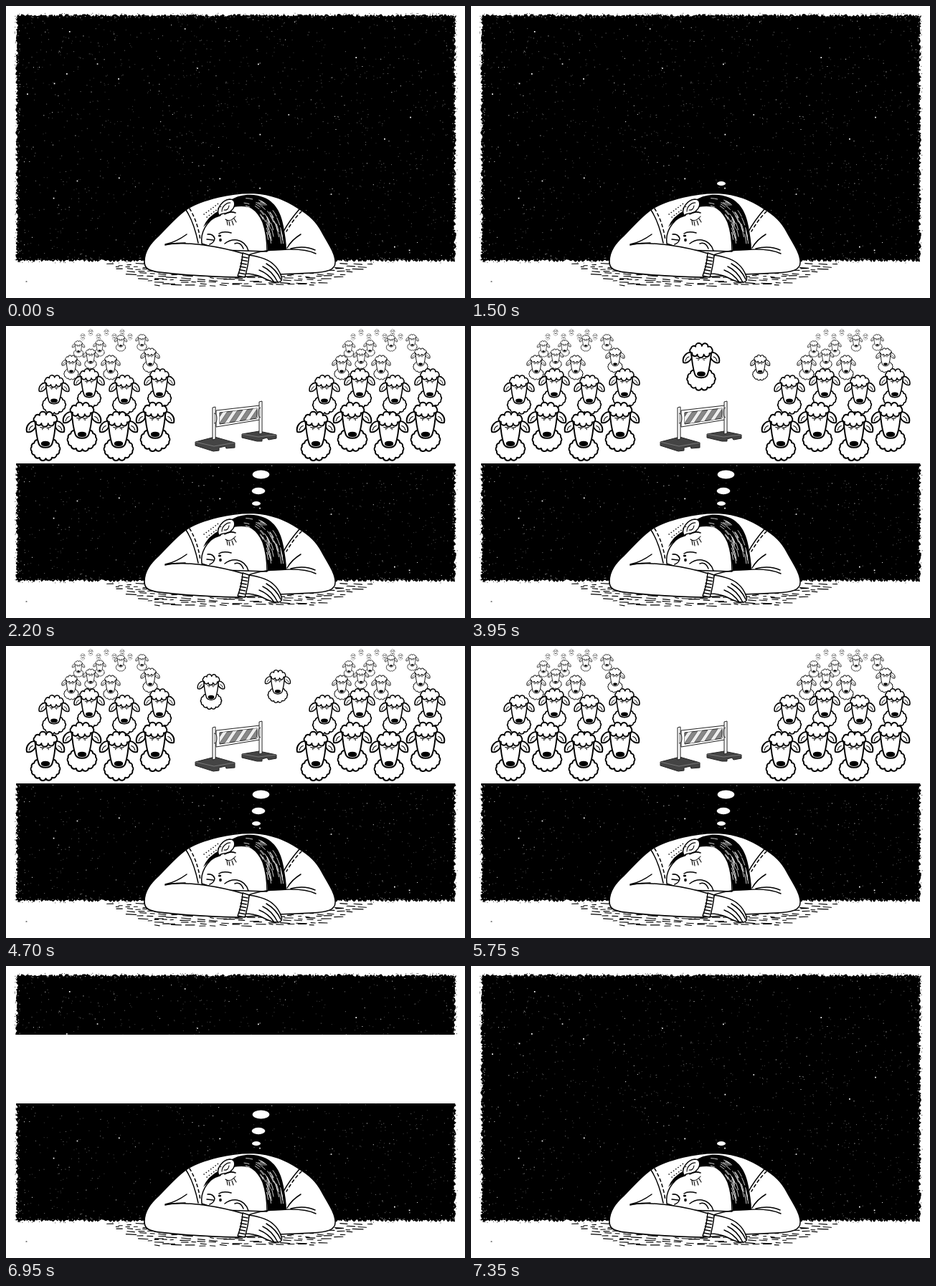
Recreate the animation shown at these times as an HTML page. Size 640 by 408 pixels, loop 7.45 s.

```html
<!DOCTYPE html>
<html lang="en">
<head>
<meta charset="utf-8">
<title>Counting sheep</title>
<style>
html, body { margin: 0; width: 100%; height: 100%; overflow: hidden; background: #fff; }
svg { display: block; width: 100%; height: 100%; }
.ink { fill: none; stroke: #000; stroke-width: 1.5; stroke-linecap: round; stroke-linejoin: round; }
.skin { fill: #fff; }
.wool { stroke-width: 1.9; }
.thin { stroke-width: 1.1; }
</style>
</head>
<body>
<svg id="stage" viewBox="0 0 640 408"></svg>
<script>
const LOOP = 7450;
const stage = document.getElementById('stage');

let seed = 71;
const rnd = () => (seed = (seed * 16807) % 2147483647) / 2147483647;
const span = (a, b) => a + rnd() * (b - a);
const mix = (a, b, u) => a + (b - a) * u;
const f = n => n.toFixed(1);
const times = (n, make) => Array.from({ length: n }, (_, i) => make(i)).join('');

// Closed outline made of round bumps along an ellipse.
function fleece(cx, cy, rx, ry, n) {
  const r = f((rx + ry) * 1.9 / n);
  const d = times(n + 1, i => {
    const a = i / n * Math.PI * 2 + 0.2;
    const p = f(cx + rx * Math.cos(a)) + ' ' + f(cy + ry * Math.sin(a));
    return i ? `A${r} ${r} 0 0 1 ${p}` : 'M' + p;
  });
  return `<path d="${d}Z"/>`;
}

function sheepShape() {
  const ear = s => `<g transform="scale(${s} 1)">
    <path d="M14 -20C20 -21 27 -14 25 -6C21 -4 15 -8 13 -13Z"/>
    <path class="thin" d="M17 -14Q21 -13 22 -8"/></g>`;
  return `<g id="sheep" class="ink skin wool">
    ${fleece(0, 17, 19, 13, 14)}${ear(1)}${ear(-1)}
    <path d="M-14 -21C-13 -8 -11 4 -9 10C-7 17 7 17 9 10C11 4 13 -8 14 -21Z"/>
    ${fleece(0, -23, 16, 6, 11)}
    <path class="thin" d="M-7 -12l5 1M2 -11l5 -1M-4 -10v1M4 -10v1"/>
    <ellipse cy="10" rx="5" ry="2.5" fill="#000"/></g>`;
}

const place = (x, y, w) => `translate(${f(x)} ${f(y)}) scale(${(w / 52).toFixed(3)})`;

// Rows from back to front; every second sheep is shifted by zig.
const rows = [
  { n: 7, x: 107, y: 15, dx: 11, dy: 0, zig: -6, w: 7 },
  { n: 4, x: 101, y: 32, dx: 29.5, dy: -4, zig: 3, w: 18 },
  { n: 1, x: 118, y: 46, dx: 0, dy: 0, zig: 0, w: 22 },
  { n: 3, x: 91, y: 58, dx: 55, dy: -5, zig: 5, w: 27 },
  { n: 4, x: 67, y: 96, dx: 49, dy: 0, zig: -9, w: 43 },
  { n: 4, x: 55, y: 154, dx: 51, dy: 0, zig: -13, w: 54 }
];
const flock = rows.map(r => times(r.n, i =>
  `<use href="#sheep" transform="${place(r.x + i * r.dx, r.y + i * r.dy + i % 2 * r.zig, r.w)}"/>`)).join('');

function night() {
  const L = 15, T = 13, R = 626, B = 356;
  const pts = [], specks = ['', ''];
  const edge = (x0, y0, x1, y1) => {
    const len = Math.hypot(x1 - x0, y1 - y0), nx = (y1 - y0) / len, ny = (x0 - x1) / len;
    for (let s = 0; s < len; s += 1.7) {
      const j = span(-1.9, 1.9), x = mix(x0, x1, s / len), y = mix(y0, y1, s / len);
      pts.push(f(x + nx * j) + ' ' + f(y + ny * j));
      if (rnd() < 0.4) {
        const out = rnd() < 0.4, k = out ? span(1, 3) : -span(1, 4);
        specks[+out] += `M${f(x + nx * k)} ${f(y + ny * k)}h.8`;
      }
    }
  };
  edge(L, T, R, T); edge(R, T, R, B); edge(R, B, L, B); edge(L, B, L, T);

  const stars = (n, size, color) => `<path stroke="${color}" stroke-width="${size}" d="${
    times(n, () => `M${f(span(19, 622))} ${f(span(17, 352))}h${size}`)}"/>`;
  return `<path d="M${pts.join('L')}Z"/>
    <path d="${specks[0]}" stroke="#fff"/><path d="${specks[1]}" stroke="#000"/>
    ${stars(1000, 0.9, '#555')}${stars(420, 0.9, '#999')}${stars(110, 1, '#eee')}${stars(24, 1.7, '#fff')}`;
}

function ground() {
  let d = 'M28 385h1';
  for (let y = 361; y < 392; y += 3.2) {
    const k = (y - 361) / 31, end = mix(506, 425, k);
    for (let x = mix(136, 212, k) + span(0, 10); x < end;) {
      const w = span(4, 15);
      d += `M${f(x)} ${f(y + span(-1.7, 1.7))}l${f(w)} ${f(span(-0.4, 1.2))}`;
      x += w + span(3, 10);
    }
  }
  return `<path class="ink thin" d="${d}"/>`;
}

// A point in the hair: u runs across from the face outwards, v along the strand.
function hairPoint(u, v) {
  const curve = (a, b, c) => mix(mix(a, b, v), mix(b, c, v), v);
  const x = mix(curve(322, 358, 365), curve(322, 386, 391), u);
  const y = mix(curve(279, 277, 340), curve(266, 258, 340), u);
  return f(x) + ' ' + f(y);
}

function sleeper() {
  const line = (d, cls = '') => `<path class="ink ${cls}" d="${d}"/>`;
  const strands = times(48, () => {
    const u = span(0.08, 0.92), v = span(0.1, 0.85);
    return `M${hairPoint(u, v)}L${hairPoint(u, v + 0.05)}L${hairPoint(u, v + 0.1)}`;
  });
  const stubble = times(14, i => {
    const k = i % 7, row = i > 6 ? 4 : 0;
    return `M${f(276 + k * 3.2 + row)} ${f(291 - k * 2.4 + row)}h.3`;
  });
  const ribs = times(6, i => `M${f(329 - i * 0.9)} ${f(350.5 + i * 4.5)}l8 1.5`);

  return line('M193 357C193 342 202 331 213 321C226 308 238 293 252 284C262 277 280 271 296 267' +
      'C312 263 330 261 346 261.500C372 263 392 272 408 283C422 291 433 301 440 315' +
      'C448 330 459 345 459 357C460 369 448 372 425 373L380 375L324 379' +
      'C280 378 240 375 215 372C198 370 193 366 193 357Z', 'skin') +
    // Hair, face and ear
    line('M273 332C271 317 278 303 296 291L318 276C340 275 352 288 358 302C363 316 364 330 364 343L300 341Z', 'skin') +
    `<path d="M315 270C326 263 346 261 361 268C378 276 384 292 387 308C389 320 391 330 391 341L365 342
      C364 322 361 306 354 294C347 281 334 278 317 281Z"/>
    <path d="M297 286Q281 294 275 309Q286 297 300 293Z"/>
    <path d="${strands}" fill="none" stroke="#fff" stroke-width=".8"/>` +
    line('M297 293C292 283 302 271 312 270C321 270 320 280 315 285C309 293 303 287 297 293Z', 'skin') +
    line('M301 287C301 280 308 274 313 275M304 285Q310 286 311 279', 'thin') +
    line(stubble) +
    line('M305 291Q312 286 320 289') +
    line('M306 298Q312 303 320 294M308 300l1 6M311 301l1 6M315 300l2 6M318 297l3 5', 'thin') +
    line('M314 317Q303 314 297 318M281 319Q289 318 291 325Q290 331 284 333M280 326l9 1') +
    `<ellipse cx="298" cy="321" rx="2.200" ry="1.600"/><ellipse cx="299" cy="327" rx="1.800" ry="2.200"/>` +
    line('M305 332Q313 326 322 327Q334 329 338 342M319 332Q327 329 331 339') +
    // Arms
    line('M222 334C237 330 257 332 276 334C297 337 315 341 331 346L324 379C280 378 240 375 215 372' +
      'C198 370 193 366 193 357', 'skin') +
    line('M222 333Q237 330 252 319M224 333Q238 331 250 331') +
    line('M338 348C356 341 380 340 397 340Q420 340 432 346M392 338Q398 327 411 319M397 339Q416 334 431 341') +
    line('M251 285Q262 302 268 331M409 284Q395 300 387 315') +
    `<path class="ink" stroke-dasharray="4 4" d="M256 283Q268 303 271 328M412 287Q400 299 391 315"/>` +
    // Hand and cuff
    line('M339 348C352 350 365 353 373 361Q380 367 384 378Q386 385 380 386C370 387 362 381 355 378Q344 374 334 374Z', 'skin') +
    line('M358 364Q371 370 379 386M363 360Q377 368 383 382M353 369Q366 374 374 386') +
    line('M330 345L339 348Q338 362 333 379L323 377Q329 362 330 345Z', 'skin') +
    line(ribs);
}

function barrier() {
  const board = 'M298 121L350 115V129L298 137Z';
  const stripes = times(5, i => `M${289 + i * 13} 140l20 -30h6l-20 30z`);
  return `<clipPath id="board"><path d="${board}"/></clipPath>
    <g stroke="#222" stroke-linejoin="round">
    <path d="M264 162L291 155L319 163V170L307 171L306 168L297 170V174L289 175L264 167Z" fill="#444"/>
    <path d="M329 151L353 147L377 152V157L366 159L364 156L357 158V161L350 161L329 156Z" fill="#444"/>
    <path d="M264 162L290 168L319 163M329 151L352 155L377 152" fill="none" stroke="#777"/>
    <path d="M293 118L354 111V131L293 141Z" fill="#fff"/>
    <path d="${board}" fill="#888"/>
    <path d="${stripes}" fill="#eee" stroke="#444" stroke-width=".6" clip-path="url(#board)"/>
    <path d="M288 114l4 -1V158l-4 1zM353 106l4 -1V150l-4 1z" fill="#fff"/>
    <path d="M290 122q4 0 4 7t-4 7M355 114q-3 0 -3 7t3 7" fill="#bbb"/></g>`;
}

// A jump rises from a to the top and falls to b, in steps of 150 ms.
// Points are x, y, width; the bend shapes the sideways motion of each half.
const STEP = 150, HALF = 4;
const top1 = [321, 57, 52];
const right = { a: [242, 113, 25], top: top1, b: [404, 104, 25], bend: [u => u, u => 1 - (1 - u) ** 2] };
const left = { a: [422, 70, 20], top: [323, 43, 52], b: [249, 95, 25], bend: [u => u ** 1.2, u => u] };
const jumps = [
  { ...right, start: 3350, steps: 9, lift: 0 },
  { ...left, start: 3800, steps: 8, lift: 5 },
  { ...left, start: 4400, steps: 9, lift: 0 }
];

function jumpPose({ a, top, b, bend, lift }, i) {
  const falling = i > HALF, u = (falling ? i - HALF : i) / HALF;
  const [p, q] = falling ? [top, b] : [a, top];
  return [mix(p[0], q[0], bend[+falling](u)), mix(p[1], q[1], u) - lift, mix(p[2], q[2], u)];
}

const bubble = (x, y, rx) =>
  `<ellipse class="bubble" cx="${x}" cy="${y}" rx="${rx}" ry="${f(rx / 2)}" fill="#fff"/>`;

stage.innerHTML = `<defs>${sheepShape()}</defs>
  <rect width="640" height="408" fill="#fff"/>
  ${night()}${ground()}${sleeper()}
  ${bubble(349, 248, 6)}${bubble(352, 230.5, 9.3)}${bubble(355.5, 207.5, 11.8)}
  <rect id="dream" width="640" fill="#fff"/>
  <g id="scene">${flock}<g transform="translate(377 0)">${flock}</g>${barrier()}</g>
  ${times(jumps.length, () => '<use class="jumper" href="#sheep"/>')}`;

const dream = document.getElementById('dream');
const scene = document.getElementById('scene');
const bubbles = stage.querySelectorAll('.bubble');
const jumpers = stage.querySelectorAll('.jumper');
const show = (el, on) => el.setAttribute('display', on ? 'inline' : 'none');

function draw(t) {
  bubbles.forEach((el, i) => show(el, t >= 1500 + 100 * i && t < LOOP - 100 * i));

  const rise = Math.floor((t - 1700) / 100), fall = Math.ceil((7150 - t) / 100);
  const level = Math.max(0, Math.min(4, rise, fall)) * 48;
  dream.setAttribute('y', 192 - level);
  dream.setAttribute('height', level);
  show(scene, t >= 2200 && t < 6750);

  jumps.forEach((jump, k) => {
    const i = Math.floor((t - jump.start) / STEP), on = i >= 0 && i < jump.steps;
    show(jumpers[k], on);
    if (on) jumpers[k].setAttribute('transform', place(...jumpPose(jump, i)));
  });
}

const t0 = performance.now();
function tick() {
  draw((performance.now() - t0) % LOOP);
  requestAnimationFrame(tick);
}
tick();
</script>
</body>
</html>
```
